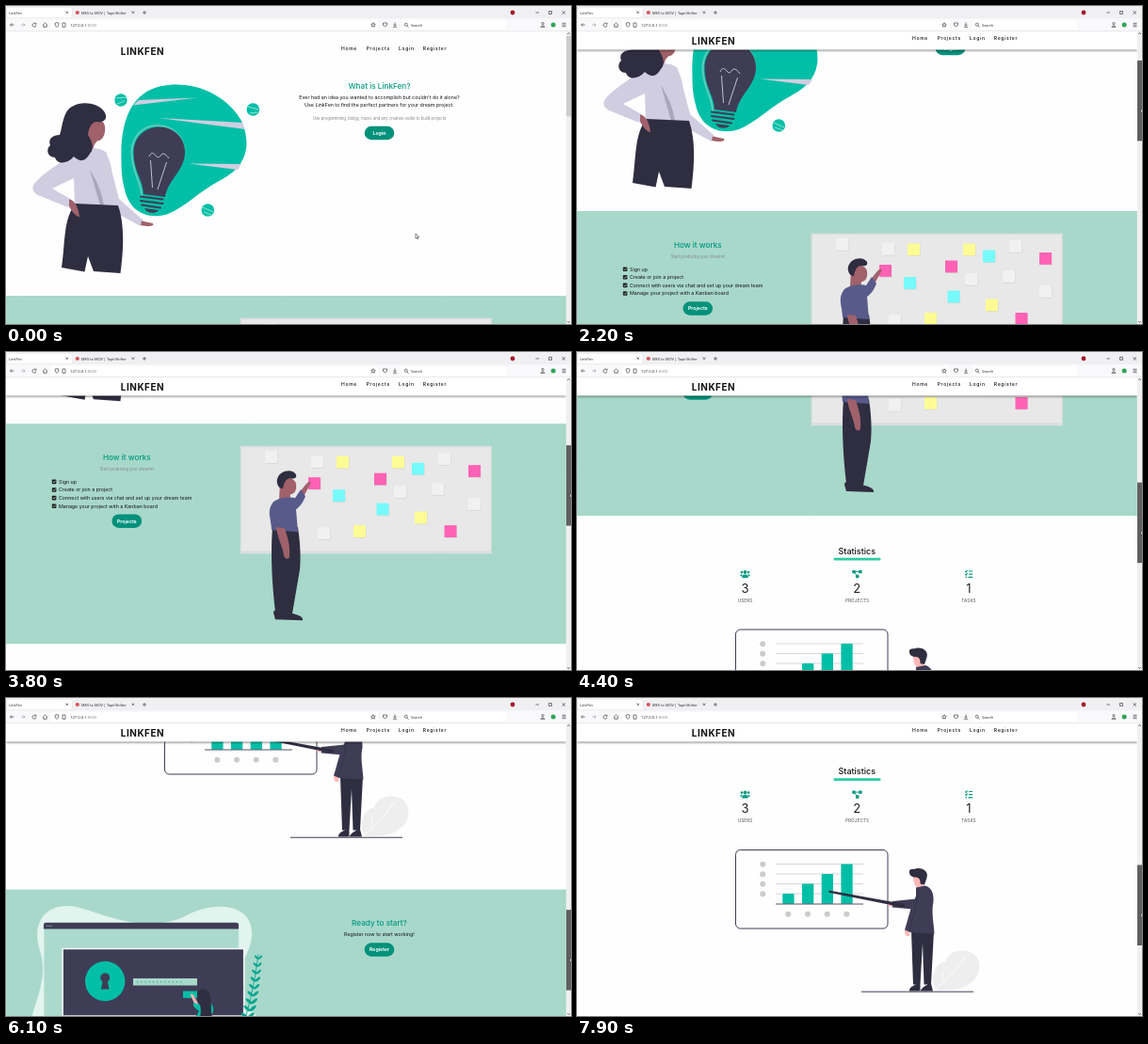
Animation, 600 px wide and 338 px high, one loop 8000 ms. Source, as an HTML page:

```html
<!DOCTYPE html>
<html lang="en">
<head>
<meta charset="utf-8">
<title>LinkFen</title>
<style>
html, body { margin: 0; width: 100%; height: 100%; overflow: hidden; background: #fff }
svg { display: block; width: 600px; height: 338px }
text { font-family: Inter, "Open Sans", sans-serif; font-size: 5.3px; fill: #111; white-space: pre }
.mid { text-anchor: middle }
.h { font-size: 8.2px; font-weight: 500; fill: #009a82; text-anchor: middle }
.small { font-size: 4.15px; fill: #858585; text-anchor: middle }
.btn rect { fill: #00917b }
.btn text { fill: #fff; font-weight: 700; text-anchor: middle; font-size: 5.2px }
.num { font-size: 13px; fill: #222; text-anchor: middle }
.label { font-size: 4.8px; fill: #555; text-anchor: middle }
.ui text { font-family: "Open Sans", sans-serif; font-size: 3.9px; fill: #222 }
.line { fill: none; stroke: #444; stroke-width: .7 }
.logo { font-size: 10px; font-weight: 700; letter-spacing: .5px }
.nav { font-size: 5px; font-weight: 500; letter-spacing: .7px }
.teal { fill: #00bfa6 }
.dark { fill: #2f2e41 }
.navy { fill: #3f3d56 }
.skin { fill: #a0616a }
.pink { fill: #ffb8b8 }
.lilac { fill: #d0cde1 }
</style>
</head>
<body>
<svg viewBox="0 0 600 338">
<defs>
  <filter id="shade" x="-5%" y="-50%" width="110%" height="220%"><feGaussianBlur stdDeviation="1.6"/></filter>
  <clipPath id="view"><rect y="27" width="595" height="311"/></clipPath>
</defs>
<rect width="600" height="338" fill="#fefefe"/>

<g clip-path="url(#view)">
<g id="page">
  <!-- intro -->
  <path class="teal" d="M122.500 165C121 122 133 92 165 85C200 78 235 95 250 122C262 150 254 172 228 185C205 197 190 214 172 221C150 228 131 218 126 195C123 185 122.500 175 122.500 165Z"/>
  <path class="lilac" d="M203 97.500L141 100L135 105.500ZM162 119L251 124L254 131ZM194 167.500L250 168L246 174Z"/>
  <g class="teal"><circle cx="122" cy="100" r="6.700"/><circle cx="262.300" cy="110" r="6.800"/><circle cx="214.300" cy="217" r="6.800"/></g>
  <path d="M117 98L128 97M118 104L126 101M257 107L268 110M259 114L267 113M209 214L220 219M210 219L218 222" stroke="#bfe9e0" stroke-width=".8"/>
  <path d="M144 202C144 186 133 176 133.500 155C134 138 146 127 160 127C177 127 189 139 189 154" fill="none" stroke="#58cdbc" stroke-width="2"/>
  <path class="navy" d="M146 200C146 186 135.500 176 135.500 156C135.500 139 148 128.500 163 128.500C178 128.500 190 140 190 155C190 175 172 184 169 203Z"/>
  <path d="M152 160C154 155 157 156 159 159S163 161 165 158S171 159 173 162M153.500 164L155.500 193M170.500 166L161 195" fill="none" stroke="#d0cde1" stroke-width=".9"/>
  <path d="M143 202.500L166.500 205.500M143 207L166.500 210M144 211.500L164 214.500" stroke="#3f3d56" stroke-width="1.900" stroke-linecap="round"/>
  <path class="navy" d="M147 215L162 217C160 221 150 221 147 215Z"/>
  <path class="skin" d="M85 124C92 118 104 119 105 128C106 136 103 143 97 143.500C93 147 92 152 93 155L80 154Z"/>
  <path class="lilac" d="M67 160C76 150 97 148 107 156L109 184L111 213L73 212L72 182Z"/>
  <path class="lilac" d="M72 156C58 167 38 178 30 189C26.500 194 29 198 34 201L66 214L70 206L49 194L74 182Z"/>
  <path class="lilac" d="M97 152C107 152 111 165 113 178L120 205L146 228L143 234L113 218C104 205 98 180 95 165Z"/>
  <path d="M89 174C95 184 102 196 104 213L100 212Z" fill="#a9a6bb"/>
  <path class="dark" d="M74 210L119 212C126 232 125 258 121.500 284L93 282L87 266L83.500 282.500L59 278C63 250 61 225 74 210Z"/>
  <path class="skin" d="M67 205.500C73 206 77 214 78 224C74 224 70 218 67 213ZM144 228.500L156 231C158 234 152 235 143 233Z"/>
  <path class="dark" d="M72 106C82 100 103 104 106 116C107 122 102 124 96 123C90 124 88 130 87 137C92 145 94 152 89 157C83 168 76 164 72 160C64 169 54 168 52 161C44 161 42 152 47 148C44 141 50 137 57 137C60 130 60 110 72 106Z"/>
  <text class="h" x="396.500" y="87.500">What is LinkFen?</text>
  <text class="mid" x="396.500" y="98.700">Ever had an idea you wanted to accomplish but couldn't do it alone?</text>
  <text class="mid" x="396.500" y="107">Use LinkFen to find the perfect partners for your dream project.</text>
  <text class="small" x="396.500" y="120.600">Use programming, biolgy, music and any creative outlet to build projects</text>
  <g class="btn" transform="translate(396.500 135)"><rect x="-15.800" y="-7.200" width="31.600" height="14.400" rx="7.200"/><text y="1.900">Login</text></g>

  <rect y="308" width="595" height="234" fill="#a8d8ca"/>
  <rect y="869" width="595" height="205" fill="#a8d8ca"/>
  <g id="specks"></g>

  <!-- how it works -->
  <g transform="translate(0 213)">
    <text class="h" x="128.300" y="134">How it works</text>
    <text class="small" x="128.300" y="145.200">Start producing your dreams!</text>
    <g id="list"></g>
    <g class="btn" transform="translate(128.300 198.500)"><rect x="-15.800" y="-7.200" width="31.600" height="14.400" rx="7.200"/><text y="1.900">Projects</text></g>
    <rect x="249.500" y="119.500" width="265.500" height="113" fill="#e8e8e8" stroke="#dcdfdf" stroke-width="1.600"/>
    <path d="M250 231H514.500" stroke="#cfd3d3" stroke-width=".8"/>
    <g id="notes"></g>
    <path class="skin" d="M291 156C296 150 307 152 308 159C309 166 306 170 302 170L301 180L290 177Z"/>
    <path class="skin" d="M309 171L318 160C321 156 324 156 323.500 158.500L314 176Z"/>
    <path class="dark" d="M283 205L301 205L299 262L298 294L286 295C282 262 281 230 283 205ZM295 205L310 205C313 225 313 240 312 250L304 297L296 296L298 255ZM284 296C284 290 296 293 302 296C310 298 316 300 315 304L286 303Z"/>
    <path d="M284 178C292 172 304 173 307 174L313 165L318 172C315 180 311 184 308 186L310 210L282 208C282 196 276 188 284 178Z" fill="#585a8a"/>
    <path class="skin" d="M287 205L296 206C299 216 302 224 301 236C300 240 296 239 295 235C294 226 288 216 287 205Z"/>
    <path class="dark" d="M288 154C290 145 304 142 308 149C309 153 306 154 301 153C297 154 295 158 294 164C289 164 287 158 288 154Z"/>
  </g>

  <!-- statistics -->
  <g transform="translate(0 498)">
    <text class="mid" x="297.300" y="84.500" style="font-size:9px;font-weight:500">Statistics</text>
    <rect x="272.500" y="88.700" width="50" height="2.800" rx="1" fill="#2bcda2"/>
    <g fill="#00987f">
      <circle cx="178.500" cy="104" r="1.900"/><circle cx="174.900" cy="104.100" r="1.300"/><circle cx="182.100" cy="104.100" r="1.300"/>
      <path d="M175.300 110V108.500Q175.300 106.500 178.500 106.500T181.700 108.500V110ZM173.200 108.300Q173 106 175.900 106.200L174.700 108.300ZM183.800 108.300Q184 106 181.100 106.200L182.300 108.300Z"/>
      <path d="M292.300 102H295.700V105.300H292.300ZM299.200 102H302.600V105.300H299.200ZM296 106.800H299.400V110.200H296Z"/>
      <path d="M294 103.600H301M294.500 104L297.500 108" stroke="#00987f" stroke-width=".9"/>
      <path d="M416 103H420.200M416 106.200H420.200M415.500 109.300H420.200M412.300 103L413.200 103.900L414.600 102M412.300 106.200L413.200 107.100L414.600 105.200M412.600 109.300H414" fill="none" stroke="#00987f" stroke-width="1.200"/>
    </g>
    <text class="num" x="178.500" y="125.700">3</text><text class="num" x="297.300" y="125.700">2</text><text class="num" x="416" y="125.700">1</text>
    <text class="label" x="178.500" y="135.800">USERS</text><text class="label" x="297.500" y="135.800">PROJECTS</text><text class="label" x="416" y="135.800">TASKS</text>
    <rect x="168.500" y="165" width="161.500" height="83.500" rx="5" fill="none" stroke="#3f3d56"/>
    <g id="chart"></g>
    <path d="M211 222.500H304" stroke="#3f3d56" stroke-width=".9"/>
    <path d="M381 314C374 300 380 285 391 284C394 271 414 268 424 278C431 289 427 301 416 308C407 315 394 314 381 314Z" fill="#eee"/>
    <path d="M379 314Q400 299 412 278M389 305L388 294" fill="none" stroke="#fff" stroke-width=".8"/>
    <path d="M302 315.700H421" stroke="#3f3d56" stroke-width="1"/>
    <path class="pink" d="M357 192H367L369 206L361 205C358 202 357 198 357 192ZM329 221C332 219 337 220 338 223L335 226L330 224ZM348.500 249H354L353 256C350 258 347 255 348.500 249Z"/>
    <path class="dark" d="M355 251H379L376 308H368.500L367 264L364.500 308H357ZM353 314C354 310 359 308 364.500 307V315H353ZM365 314C368 310 371 308 376 307L378 315H365Z"/>
    <path class="navy" d="M360 205L370 203C377 205 379 212 378.500 220C376 231 379 243 379.500 254L354 252.500L348 250C351 240 353 232 355 226L360 214Z"/>
    <path class="navy" d="M360 217L335 219.500V226L362 228.500Z"/>
    <path class="dark" d="M267.500 208L347.500 222.500L348.500 225.500L346 226L267.500 210.200Z"/>
    <path d="M362 207L359 229L353 251" fill="none" stroke="#2f2e41" stroke-width=".6"/>
    <path class="dark" d="M353 189C352 184 358 186 361 184.500C369 184 374 189 371 196L369 202L364.500 201C365 197 363 194 360 194C356 194 353 192 353 189Z"/>
  </g>

  <!-- register -->
  <g transform="translate(0 741)">
    <path d="M36 193C25 158 48 140 77 147C112 157 145 174 187 158C218 139 263 141 261 177C259 207 230 220 246 247C264 255 275 271 271 285C264 305 215 303 174 303C120 306 27 309 25 280C25 255 47 226 36 193Z" fill="#e1f4ee"/>
    <rect x="40.500" y="164" width="206.500" height="129" rx="2" fill="#abdacd" stroke="#c4e4da" stroke-width=".8"/>
    <path class="navy" d="M40 170V165.500Q40 163.300 42.500 163.300H244.500Q247 163.300 247 165.500V170Z"/>
    <path d="M43 166.800H49" stroke="#a8d8ca" stroke-width="1" stroke-dasharray="1 1.300"/>
    <rect class="navy" x="60.200" y="191" width="192.500" height="71.500" style="stroke:#f1f8f6;stroke-width:1.500"/>
    <circle class="teal" cx="105.200" cy="225.500" r="21.200"/>
    <path class="navy" d="M102.500 226A5 5 0 1 1 108 226L109.500 234H101Z"/>
    <rect x="135" y="222.500" width="68" height="7.500" fill="#a8d8ca"/>
    <path d="M139 226.300H188" stroke="#2aa994" stroke-width="1.200" stroke-dasharray="1.200 3"/>
    <rect class="teal" x="188" y="236" width="15" height="7.300"/>
    <path d="M248 282Q261 250 268 197" fill="none" stroke="#009f89" stroke-width=".8"/>
    <g id="leaves" fill="#00a58e"></g>
    <path class="pink" d="M195.500 239L199 240L205 251L202 254Z"/>
    <path class="dark" d="M203 260H216C217 275 217 293 215 309L218 313L207 314L209 285L204 279C202 292 197 301 196 310L198 315H189C191 296 196 276 203 260Z"/>
    <path class="teal" d="M199 248C204 250 207 252 211 247C217 245 221 251 220 258C218 264 209 264 202 263L205 257C201 255 198 252 199 248Z"/>
    <path class="dark" d="M203 239C204 233 213 232 216 238C219 246 217 257 219 264L206 264C208 254 206 250 204 246Z"/>
    <text class="h" x="396.500" y="166.300">Ready to start?</text>
    <text class="mid" x="396.500" y="177.900">Register now to start working!</text>
    <g class="btn" transform="translate(396.500 192)"><rect x="-15.800" y="-7.200" width="31.600" height="14.400" rx="7.200"/><text y="1.900">Register</text></g>
  </g>
</g>
<!-- page header -->
<g id="bar">
  <rect y="29" width="595" height="18" fill="#000" opacity=".65" filter="url(#shade)"/>
  <rect y="27" width="595" height="19.500" fill="#fff"/>
</g>
<g id="head">
  <text class="logo" x="121.800" y="51.700">LINKFEN</text>
  <g class="nav"><text class="nav" x="356" y="46.900">Home</text><text class="nav" x="382.700" y="46.900">Projects</text><text class="nav" x="417" y="46.900">Login</text><text class="nav" x="442.800" y="46.900">Register</text></g>
</g>
</g>

<!-- browser -->
<g class="ui">
  <rect width="600" height="13.500" fill="#f0f0f3"/>
  <rect y="13.500" width="600" height="13" fill="#f9f9fb"/>
  <path d="M0 26.700H600" stroke="#dcdce0" stroke-width=".6"/>
  <rect x="1" y="1.500" width="69" height="11" rx="1.200" fill="#fff" stroke="#ddd" stroke-width=".4"/>
  <rect x="48" y="15" width="347" height="10" rx="1.200" fill="#fff"/>
  <rect x="420" y="15" width="111" height="10" rx="1.200" fill="#fff"/>
  <text x="3" y="8.500">LinkFen</text>
  <circle cx="75.800" cy="7" r="2.100" fill="#d8555c"/>
  <text x="80" y="8.500">MKV to MOV | TapirShifter</text>
  <text x="68" y="21.700" style="font-size:4.200px">127.0.0.1<tspan fill="#888">:8000</tspan></text>
  <text x="430" y="21.700" fill="#555">Search</text>
  <path class="line" d="M63.500 5.500L66 8M66 5.500L63.500 8M133.700 5.500L136.200 8M136.200 5.500L133.700 8M145 7H149M147 5V9M562.500 7H566M576.500 5.500H579.500V8.500H576.500ZM590.500 5.300L594 8.700M594 5.300L590.500 8.700"/>
  <path class="line" d="M8.500 20H4.500L6.200 18.300M4.500 20L6.200 21.700M39 20.300L41.500 18L44 20.300M39.800 20V22.300H43.200V20M52 18.300L54 17.500L56 18.300Q56 21.500 54 22.500Q52 21.500 52 18.300ZM60 18H63V22.300H60ZM390 17.700L390.700 19.300L392.300 19.400L391 20.500L391.400 22.200L390 21.300L388.600 22.200L389 20.500L387.700 19.400L389.300 19.300ZM400.500 18H404.500V20.500Q402.500 23 400.500 20.500ZM413 17.500V21M411.500 19.700L413 21.200L414.500 19.700M411 22.300H415M426 21L427.500 22.500M590.500 18.300H594.500M590.500 20H594.500M590.500 21.700H594.500"/>
  <path class="line" d="M16 20H20L18.300 18.300M20 20L18.300 21.700" opacity=".45"/>
  <path class="line" d="M31.500 18.800A2 2 0 1 0 32 20.500M32 17.700V19.200H30.500"/>
  <circle class="line" cx="424.800" cy="19.700" r="1.500"/>
  <circle class="line" cx="570" cy="18.700" r="1.200"/><path class="line" d="M567.800 22.300Q570 19.500 572.200 22.300Z"/>
  <circle cx="538" cy="7" r="2.400" fill="#a3172c"/>
  <circle cx="581.200" cy="20" r="2.500" fill="#30a556"/>
</g>
<rect x="594.800" y="27" width="5.200" height="311" fill="#f0f0f0"/>
<path d="M596.200 30L597.500 28.500L598.800 30M596.200 335L597.500 336.500L598.800 335" class="line"/>
<rect id="thumb" x="595" width="5" height="85.500"/>
<path id="mouse" d="M0 0V5L1.200 4L2 5.700L2.800 5.300L2 3.700H3.600Z" fill="#fff" stroke="#222" stroke-width=".55"/>
</svg>

<script>
const $ = id => document.getElementById(id);
const fill = (id, items, draw) => { $(id).innerHTML = items.map(draw).join(''); };
const range = n => [...Array(n).keys()];

let seed = 11;
const rnd = () => (seed = (seed * 16807) % 2147483647) / 2147483647;
fill('specks', range(420), i => {
  const y = i < 225 ? 309 + rnd() * 231 : 870 + rnd() * 202;
  const x = rnd() * 593, dx = rnd() * 2 - 1, dy = rnd() * 2;
  return `<path d="M${x} ${y}l${dx} ${dy}" stroke="${rnd() < .6 ? '#c8eadf' : '#8fc6b6'}" stroke-width=".7" opacity=".5"/>`;
});

fill('list', ['Sign up', 'Create or join a project',
  'Connect with users via chat and set up your dream team',
  'Manage your project with a Kanban board'], (s, i) => {
  const y = 158.600 + i * 8.600;
  return `<rect x="48.800" y="${y - 4.200}" width="4.600" height="4.600" rx=".7" fill="#222"/>
    <path d="M49.800 ${y - 2}l1.100 1.100l1.700-2" fill="none" stroke="#cfeae2" stroke-width=".7"/>
    <text x="56" y="${y}">${s}</text>`;
});

const notes = {
  '#f1f1f1': [[275, 124], [324, 129], [459, 126], [331, 205], [412, 161], [452, 158], [491, 174]],
  '#ff62b4': [[321, 152], [391, 147.500], [491, 139], [465.500, 203]],
  '#fdfc94': [[351, 129.500], [410, 129.500], [369, 203], [434, 188.500]],
  '#76fafc': [[347, 165], [431, 136.500], [393.500, 179.500]]
};
fill('notes', Object.entries(notes), ([c, list]) => list.map(([x, y]) =>
  `<rect x="${x + .5}" y="${y + .7}" width="13" height="12.800" fill="#d3d5d5"/>
   <rect x="${x}" y="${y}" width="13" height="12.800" fill="${c}"/>`).join(''));

fill('chart', range(4), i => {
  const y = 180 + i * 10.500, x = 218.300 + i * 20.700, top = 211.500 - i * 10.500;
  return `<path d="M211 ${y}H304" stroke="#ccc" stroke-width=".8"/>
    <circle cx="197.200" cy="${y + .2}" r="3" fill="#ccc"/>
    <circle cx="${x + 6}" cy="233.200" r="3" fill="#ccc"/>
    <rect class="teal" x="${x}" y="${top}" width="12.300" height="${222.200 - top}" rx=".8"/>`;
});
// later grid lines must not cover earlier bars
$('chart').querySelectorAll('rect').forEach(r => $('chart').append(r));

fill('leaves', range(20), i => {
  const k = i >> 1, side = i % 2 ? 1 : -1, u = k / 9;
  const x = 251 + 17 * Math.sqrt(u), y = 273 - u * 71;
  return `<ellipse cx="${side * 4.200}" rx="4.300" ry="1.600" transform="translate(${x} ${y}) rotate(${side * -42}) scale(${1.100 - u * .45})"/>`;
});

// monotone cubic through [time, value] keys
function track(keys, t) {
  const n = keys.length;
  if (t <= keys[0][0]) return keys[0][1];
  if (t >= keys[n - 1][0]) return keys[n - 1][1];
  const slope = i => (keys[i + 1][1] - keys[i][1]) / (keys[i + 1][0] - keys[i][0]);
  const tangent = i => {
    if (i === 0 || i === n - 1) return 0;
    const a = slope(i - 1), b = slope(i);
    return a * b > 0 ? 2 * a * b / (a + b) : 0;
  };
  const i = keys.findIndex((k, j) => t < keys[j + 1][0]);
  const [t0, v0] = keys[i], [t1, v1] = keys[i + 1], h = t1 - t0, s = (t - t0) / h;
  return v0 + (v1 - v0) * s * s * (3 - 2 * s)
    + h * s * (1 - s) * (tangent(i) * (1 - s) - tangent(i + 1) * s);
}

const scrollKeys = [[1200, 0], [2200, 90], [3000, 213], [3500, 226], [3700, 226], [4400, 368],
  [5300, 496], [5500, 497], [5600, 498], [6400, 741], [7000, 741], [7900, 501.500]];
const mouseX = [[0, 435], [800, 599]];
const mouseY = [[0, 242], [800, 83]];
const overshoot = [[6200, 0], [6600, 13], [7000, 13], [7300, 0]];
const LOOP = 8000, STEP = 100;

function draw(t) {
  const y = track(scrollKeys, t), top = 31.800 + y * .2905;
  const p = Math.min(1, Math.max(0, (t - 1400) / 300));
  $('page').setAttribute('transform', `translate(0 ${-y})`);
  $('bar').setAttribute('opacity', p);
  $('head').setAttribute('transform', `translate(0 ${-11 * p})`);
  $('thumb').setAttribute('y', top);
  $('thumb').setAttribute('fill', t < 800 ? '#cdcdcd' : t < 1100 ? '#a6a6a6' : '#606060');
  const my = t < 800 ? track(mouseY, t) : top + 51 + track(overshoot, t);
  $('mouse').setAttribute('transform', `translate(${track(mouseX, t)} ${my})`);
}

const start = performance.now();
function tick() {
  const t = (performance.now() - start) % LOOP;
  draw(Math.floor(t / STEP) * STEP);
  requestAnimationFrame(tick);
}
tick();
</script>
</body>
</html>
```
